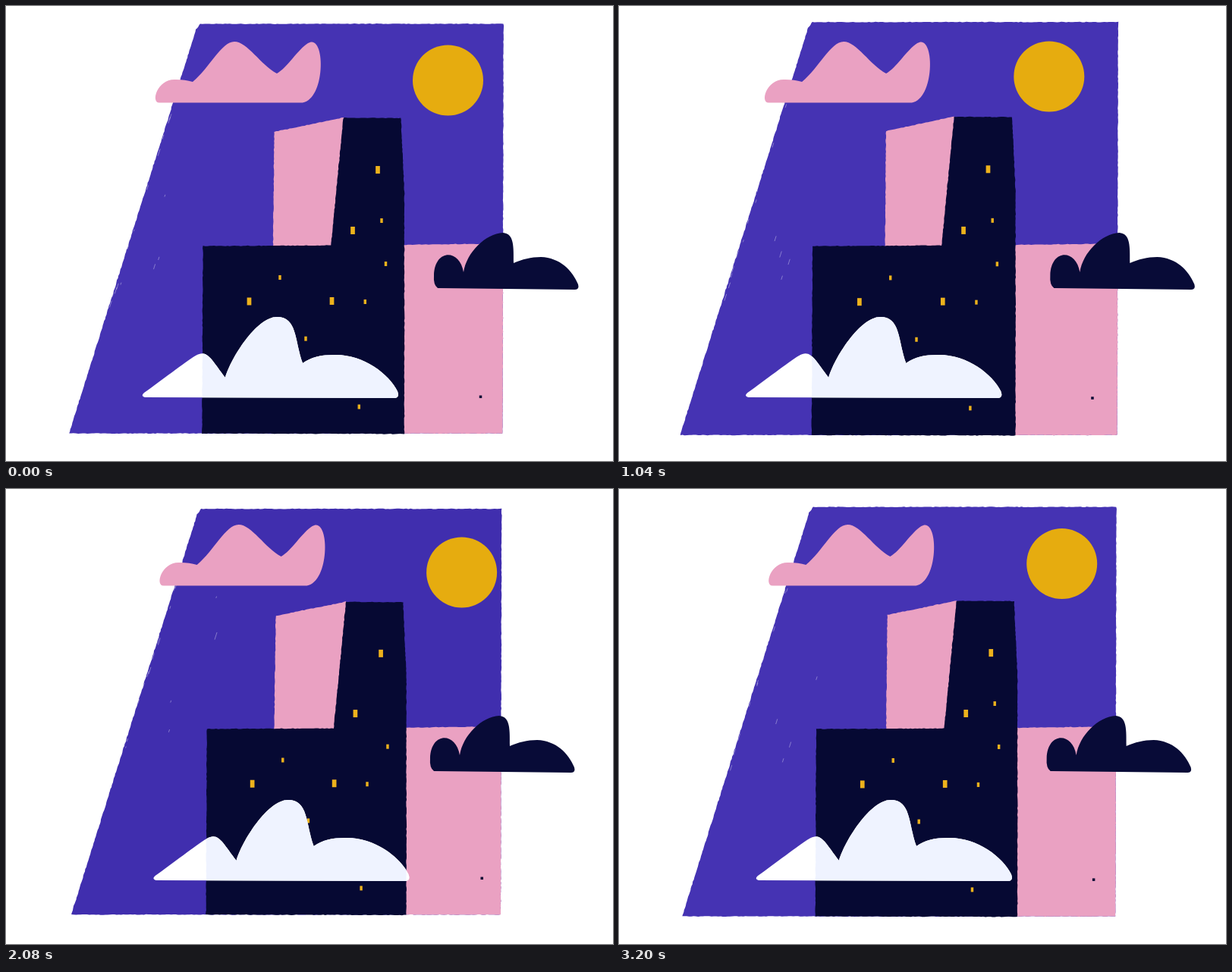
Recreate the animation shown at these times as an HTML page with a canvas. Size 800 by 600 pixels, loop 3280 ms.

```html
<!DOCTYPE html>
<html>
<head>
<meta charset="utf-8">
<style>
html, body { margin: 0; width: 100%; height: 100%; overflow: hidden; background: #fff; }
canvas { display: block; width: 800px; height: 600px; }
</style>
</head>
<body>
<canvas id="stage" width="800" height="600"></canvas>
<script>
const ctx = document.getElementById('stage').getContext('2d');
const LOOP = 3280, STEP = 80, RESTART = 1120, REST = 0.6585;
const NAVY = '#060933', PINK = '#eaa1c2', GOLD = '#e6ac0f', LAMP = '#edb21c';
const CX = 392, CY = 305;

// x, y, height, in the order the lights turn on
const windows = [
  [490, 216, 10], [457, 296, 10], [320.5, 389.5, 10], [500.5, 340, 6], [361, 358, 6],
  [473.3, 390, 6], [429.5, 389, 10], [395, 438.7, 6], [465.3, 528.5, 6], [495, 283, 6]
];

const whiteCloud = new Path2D('M183 516Q177 514 182 510C205 494 235 470 250 461S270 465 289 490C296 465 330 410 357 410S380 440 391 471C402 463 415 460 433 460C470 459 505 485 516 508Q519 516 513 517Z');
const pinkCloud = new Path2D('M202 127.5C190 127 200 95 224 97Q236 97 246 100C268 82 284 47 301 47S336 78 357 89C370 82 385 57 398 49C422 34 422 128 388 127.5Z');
const darkCloud = new Path2D('M569 372Q563 368 564 355C565 320 598 320 603 351C607 325 632 300 655 299C670 300 669 318 669 339C680 334 692 331 705 331C730 332 746 348 754 367Q756 374 750 374Z');

let q, zoom, random;

function seeded(seed) {
  return () => (seed = (seed * 16807) % 2147483647) / 2147483647;
}

// Camera zoom around the centre plus a sideways drift
function place(x, y, drift = 0) {
  return [CX + (x - CX) * zoom + drift * q, CY + (y - CY) * zoom];
}

// Polygon with a slightly worn outline; each point is x, y, drift
function roughPath(points) {
  const path = new Path2D();
  const jitter = () => (random() - 0.5) * 0.8;
  const placed = points.map(point => place(...point));
  placed.forEach(([x, y], i) => {
    const [nx, ny] = placed[(i + 1) % placed.length];
    const n = Math.ceil(Math.hypot(nx - x, ny - y) / 3);
    for (let k = 0; k < n; k++) {
      path.lineTo(x + (nx - x) * k / n + jitter(), y + (ny - y) * k / n + jitter());
    }
  });
  path.closePath();
  return path;
}

function fill(path, color, dx = 0) {
  ctx.save();
  ctx.translate(dx, 0);
  ctx.fillStyle = color;
  ctx.fill(path);
  ctx.restore();
}

function clipped(path, paint) {
  ctx.save();
  ctx.clip(path);
  paint();
  ctx.restore();
}

function drawBox(x, y, w, h, drift, color) {
  const [px, py] = place(x, y, drift);
  ctx.fillStyle = color;
  ctx.fillRect(px - w / 2, py - h / 2, w, h);
}

function drawScratches() {
  ctx.strokeStyle = 'rgba(255,255,255,.6)';
  ctx.lineWidth = 0.6;
  for (let i = 0; i < 16; i++) {
    // Most wear follows the slanted edge, the rest is scattered
    const y = 100 + random() * 300, len = 2 + random() * 8;
    const inset = i % 4 ? 1 + random() * 3 : random() * 90;
    const x = 252 - (y - 24) * 0.315 + inset;
    ctx.beginPath();
    ctx.moveTo(...place(x, y));
    ctx.lineTo(...place(x - len * 0.315, y + len));
    ctx.stroke();
  }
}

function draw(time) {
  const index = Math.floor(time / STEP) % (LOOP / STEP);
  const p = ((index * STEP - RESTART + LOOP) % LOOP) / LOOP;
  const texture = Math.floor(index % 13 / 4.4);
  q = p - REST;
  zoom = 1 + 0.0257 * q;
  random = seeded(71 + texture * 977);

  ctx.fillStyle = '#fff';
  ctx.fillRect(0, 0, 800, 600);

  // Sky brightens during the first half
  const k = Math.min(1, p / 0.45);
  const sky = roughPath([[250.5, 31], [256, 23.5], [655.7, 23.5], [654.5, 563.7], [83, 563.7]]);
  fill(sky, `rgb(${54 + 15 * k},${38 + 13 * k},${166 + 13 * k})`);
  clipped(sky, () => {
    drawScratches();
    ctx.fillStyle = GOLD;
    ctx.beginPath();
    ctx.arc(582.5 - 49.5 * q, 98 - 23.6 * q + 24.7 * q * q, 46.5, 0, 7);
    ctx.fill();
  });

  fill(pinkCloud, PINK, -15.4 * q);

  clipped(sky, () => fill(roughPath([[515, 315], [625, 313.5], [660, 314], [660, 570], [515, 570]]), PINK));
  fill(roughPath([
    [353.5, 166, -4.5], [445, 147, -10.8], [432, 320, -10.8], [352, 320, -3]
  ]), PINK);

  const tower = roughPath([
    [444.6, 147.3], [520.5, 147.7], [525, 245], [525, 564.3],
    [258.3, 563.7], [259.5, 316.5], [428.3, 315.7]
  ].map(([x, y]) => [x, y, -10.8]));
  fill(tower, NAVY);

  windows.forEach(([x, y, size], i) => {
    // Higher windows drift faster
    const drift = -9.5 - Math.max(0, 340 - y) / 30;
    if (p >= (i - 4) * 0.07) drawBox(x, y, size * 0.57, size, drift, LAMP);
  });
  drawBox(625.5, 515.3, 3.5, 3.5, -10.8, NAVY);

  fill(whiteCloud, '#fff', -40 * q);
  clipped(tower, () => fill(whiteCloud, '#eff3ff', -40 * q));
  fill(darkCloud, '#080b37', 13.7 * q);
}

const start = performance.now();
function tick() {
  draw(performance.now() - start);
  requestAnimationFrame(tick);
}
tick();
</script>
</body>
</html>
```
